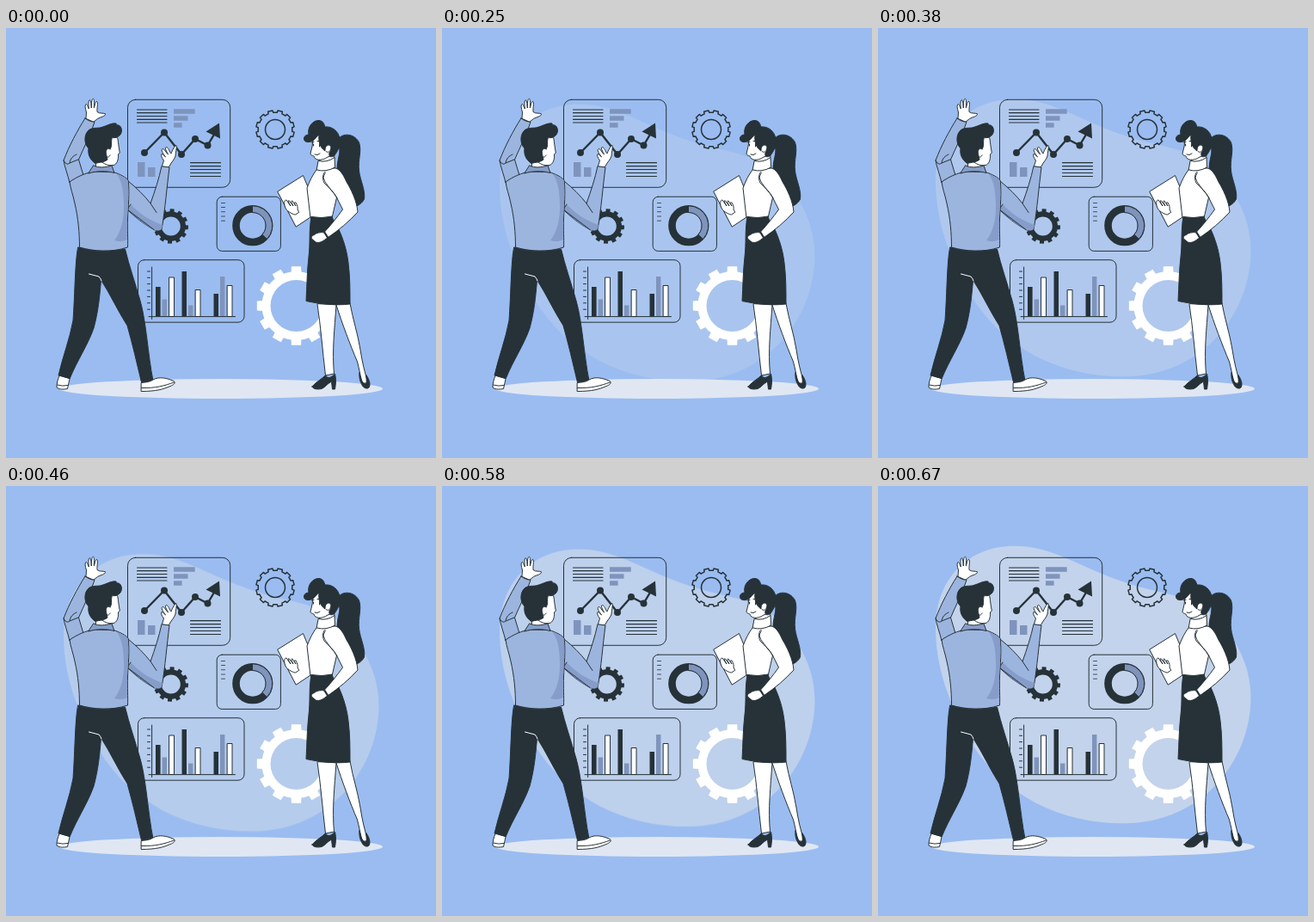
An HTML page that plays this animation: 500x500 px, repeating every 710 ms.

```html
<!DOCTYPE html>
<html lang="en">
<head>
<meta charset="utf-8">
<title>Data presentation</title>
<style>
  html, body { margin: 0; width: 100%; height: 100%; overflow: hidden; background: #9abcf1; }
  svg { display: block; width: 100vw; height: 100vh; }
  .k { fill: #263238; }
  .g { fill: #7f94bd; }
  .w { fill: #fff; }
  .shirt { fill: #9cb5df; }
  .shade { fill: #869dca; }
  .l { fill: none; }
  .o { stroke: #263238; stroke-width: 1; stroke-linejoin: round; stroke-linecap: round; }
  #blob { animation: rise 710ms -5ms infinite; }
  /* 17 poses per loop; the first two are alike */
  @keyframes rise {
    0% { opacity: .03; transform: translateY(29px); animation-timing-function: steps(1, end); }
    11.765% { opacity: .125; transform: translateY(26.25px); animation-timing-function: steps(15, end); }
    100% { opacity: 1.0625; transform: translateY(-1.875px); }
  }
</style>
</head>
<body>
<svg viewBox="0 0 500 500">
  <path id="blob" fill="#c3d3eb" d="M67 165C67 110 103 69.7 159 69.7C205 69.7 234 95 290 113C332 127 374 126 403 164C424 191 433.5 218 433.5 246C433.5 316 380 392.3 285 392.3C212 392.3 146 360 108 298C82 252 67 210 67 165Z"/>
  <ellipse cx="250" cy="419.5" rx="188" ry="11.5" fill="#e0e7f3"/>

  <!-- gears: centre, outer, root and hub radius, turn -->
  <path class="w" fill-rule="evenodd" data-gear="337.5 323 46 40 30 0"/>
  <path class="k" fill-rule="evenodd" data-gear="191.8 230.5 20.3 17.2 11 4"/>
  <path class="l o" style="stroke-width:1.5" data-gear="313 118 22.3 19.8 11.5 15"/>

  <!-- line chart panel -->
  <rect class="l o" x="141.500" y="83.300" width="119.200" height="102" rx="9"/>
  <path class="l o" style="stroke-width:1.2" d="M152.500 95H187M152.500 98.700H187M152.500 102.500H187M152.500 106.300H187M152.500 110H187M214.500 156.700H249.500M214.500 160.600H249.500M214.500 164.500H249.500M214.500 168.500H249.500M214.500 172.500H249.500"/>
  <path class="g" d="M195 94.300H219.700V99.800H195ZM195 102.300H211.500V107.800H195ZM195 110.300H204.600V115.800H195ZM153 156H161.500V173H153ZM165 162H173.500V173H165Z"/>
  <path class="l o" style="stroke-width:2.4" d="M161 145L184 121.500L204 147L220 129L234.500 136.500L243 122"/>
  <g class="k">
    <circle cx="161" cy="145" r="4"/><circle cx="184" cy="121.500" r="4"/><circle cx="204" cy="147" r="4"/><circle cx="220" cy="129" r="4"/><circle cx="234.500" cy="136.500" r="4"/>
    <path d="M248 110.500L249 128.500L232.500 120.500Z"/>
  </g>

  <!-- donut panel -->
  <rect class="l o" x="245.200" y="196.200" width="74.200" height="63.200" rx="6"/>
  <path class="l o" style="stroke-width:.8" d="M250.500 203.500H254.500M250.500 208.500H254.500M250.500 213.700H254.500M250.500 219H254.500M250.500 224.200H254.500"/>
  <circle class="l" cx="286.800" cy="229.700" r="19.300" stroke="#263238" stroke-width="8.600"/>
  <path class="g o" d="M286.800 206.800A22.900 22.900 0 0 1 303.500 245.400L297.900 240.200A15.200 15.200 0 0 0 286.800 214.500Z"/>

  <!-- bar chart panel -->
  <rect class="l o" x="153.500" y="269.700" width="123.500" height="72.500" rx="7"/>
  <path class="k" d="M174 301H179.600V335.500H174ZM204.500 283H210V335.500H204.500ZM241.500 309H247V335.500H241.500Z"/>
  <path class="g" d="M181.600 315.500H187V335.500H181.600ZM212 322.500H217.400V335.500H212ZM249 289H254.400V335.500H249Z"/>
  <path class="w o" d="M190 290H195.500V335.500H190ZM220.500 304.500H226V335.500H220.500ZM257.500 299.500H263V335.500H257.500Z"/>
  <path class="l o" d="M169.600 278V338.500M166 335.600H266.500M164.500 283H167.500M164.500 290.300H167.500M164.500 297.600H167.500M164.500 305H167.500M164.500 312.400H167.500M164.500 319.800H167.500M164.500 327.200H167.500"/>

  <!-- man -->
  <g class="o">
    <path class="w" d="M93 105L93.500 98C92 93 91.500 90 93 88.500C94.500 88 95 92 96.300 94C96 89 95.500 84 97.300 83.800C99 84 98.700 90 99.300 93C99.500 88 99.500 82.500 101.300 82.300C103.200 82.500 102.200 89 102.400 93C103.500 89 104 85 105.700 85.500C107.500 86.500 105.600 92 106 97.500C109 100 113 98.500 115.500 99.800C116 102.500 110 103.500 106.500 105.500L102 109Z"/>
    <path class="shirt" d="M92 105C96 108 99 109 103 109.300C98 125 90 140 84.500 153L90.500 173L74 180C72 171 68 161 67 154C73 138 83 119 92 105Z"/>
    <path class="l" d="M67 154C70 160 73 158 74 157L84 153M74 157C75 151 78 149 82 147"/>
    <path class="w" d="M105 155L104 163C110 166 117 166 121.500 165L121 158Z"/>
    <path class="w" d="M121 127C126 124.500 129 125.500 130 129C130.500 133 131 138 132.300 145L130.500 147C131 153 129 158.500 125 159.500C119 160.500 113 158 110 154L113 132Z"/>
    <path class="k" d="M96 119C100 115 107 117 111 115.500C117 114 123 110 128 111C128 113 130 112.500 132 113.500C136 117 135 124 130 126.500C127 128.500 125 127 123 128C122 133 123.500 138 121 141C117 139 115 144 117 149L118 153C114 156.500 108 156 104 157.500C97 153 95 146 96 140C90 134 91 123 96 119Z"/>
    <path class="w" d="M121 141C117 138 115 144 117 148.500C118 151.500 120 150 121 148"/>
    <path class="shirt" d="M142 178C152 186 161 195 168 204C173 190 178 175 181 160.500C184 159.500 187 160 190 162C187 185 185 211 181.500 231.500C181 237 176 236 172 234.500C160 228 150 220 141 211Z"/>
    <path class="shade" stroke="none" d="M145 205C156 217 168 224 181.800 229C181.500 237 176 236 172 234.500C163 230 152 221 142 211Z"/>
    <path class="l" d="M168 204L175 214.500M145 205L141 211L172 234.500"/>
    <path class="w" d="M181.500 160.500L183.500 154C181 151 180 148 181 146.500C182.500 146 184 149 185.500 150C182 145 180 142 182 140.500C184 140 186 145 188.500 147C186 142 184 139 186.500 138.500C189 139 190 144 192 146C193.500 142 196 137 198 136.500C199 139 197 145 197 149C196 153 192 156 189.500 161.500Z"/>
    <path class="shirt" d="M74 179C82 173 94 168 102 167L125 167.500C132 170 139 173 142 177C144 191 142 208 141.500 222C141 234 142 246 141.500 255C123 261 103 260 85.500 255C85.500 239 84 221 80 204C78 194 75 187 74 179Z"/>
    <path class="shade" stroke="none" d="M129 170C135 172 140 174 141.500 177C143.500 191 141.500 208 141 222L140.500 246C136 249 129 248 126 247C134 237 137 222 137 209C137 195 136 180 129 170Z"/>
    <path class="shade" d="M102 160C108 163 115 162 123 160L126 168.500C116 166 106 166 96 169Z"/>
    <path class="k" d="M84 255C102 261 122 260 138.500 257C143 276 150 296 156 317C163 341 165 380 171 410L157.500 412C152 389 147 367 141 346C130 329 121 309 110.500 293C109 312 107 331 102 349C95 369 83 386 74 408L61 404C66 382 74 362 78 340C80 312 80 284 82.500 262Z"/>
    <path class="l" stroke="#fff" d="M96.500 286L108 289Q110 291 111 294"/>
    <path class="w" d="M62 404.500C60 409 59 413 59 418C63 421 68 420 71.500 419.500L74 408Z"/>
    <path class="l" d="M59.500 415Q66 417 72 415.500"/>
    <path class="w" d="M157.500 412.500C161 412 167 412 171 409C178 405 187 407 195 410.500C198 412.500 195 415 191 416.500C183 420 175 422.500 157.500 422.500Z"/>
    <path class="l" d="M157.500 418.500C174 419 184 416 195.500 412"/>
  </g>

  <!-- woman -->
  <g class="o">
    <path class="k" d="M387 128C394 121 406 124 410.500 133C414 143 409 153 410.500 166C412 178 418 188 416.500 199C413 206 405 209 400 208C401 195 386 178 385 163C385 153 390 144 387 138Z"/>
    <path class="w" d="M362 321C366 347 368 375 371.500 404L381.500 402C379 376 382 350 384 322Z"/>
    <path class="w" d="M384 322C391 344 400 368 408.500 388C411 397 412 406 414.500 413L421 413C417 400 414 388 412 374C409 355 403 338 400 320Z"/>
    <path class="k" d="M356 417C361 411 369 407 371.500 403.500C374 409 379 406 382.500 402C384 408 383.500 414 382.500 420H379.500L378.500 411C373 414 371 418 367 419.500C362 420.500 357 420 356 417Z"/>
    <path class="k" d="M411 401C412 408 415 414 418 414C420 413 419 408 418.500 403C422 408 424 413 422.500 417.500C420 421 415 418 414 415C411 410 410.500 405 411 401Z"/>
    <path class="w" d="M316 190L345.500 171.500L363 214L337.500 231Z"/>
    <path class="w" d="M365 147L364.500 157L381.500 156L382 145Z"/>
    <path class="w" d="M361 165C357 170 353 178 350 186L354 221H379L384.500 197L383 163Z"/>
    <path class="k" d="M355 219.500Q367 222 379 219C380 223 382 225 384 228C391 242 396 256 398 273C400 289 400 305 400 321C383 323 366 321 349 317.500C350 300 350 283 352 266C354 250 352 235 355 219.500Z"/>
    <path class="w" d="M384.500 197L391.500 211C385 220 378 229 370.500 237L374.500 243.500C387 235 399 225 409 214C408 201 401 187 396 179C392 170 388 164 383 163C376 163 370 168 369 174C372 183 380 189 384.500 197Z"/>
    <path class="w" stroke="none" d="M372 165L383 163.800L384 190L371 178Z"/>
    <path class="l" d="M384.500 197C381 190 374 185 370 180C367 174 369 169 371 167"/>
    <path class="w" d="M363.500 154.500Q373 157 382 150.500L382.500 162Q372 168 361.500 165Z"/>
    <path class="w" d="M359 123C356 127 357 133 356 138L354 146C355 149 357 148 358 149C359 154 367 155 374 150C380 149 386 142 387 137L382 121Z"/>
    <path class="k" d="M357 131C352 134 346 133 346.500 128C347 125 350 124 352 124C350 115 357 107 364 107.500C369 108 370 112 371 115C379 114 387 120 388 129C389 136 386 144 381 149C377 151 375 149 376 145C379 142 377 136 373 136C372 140 371 142 371 143C365 139 363 132 364 124C361 126 360 129 357 131Z"/>
    <path class="w" d="M372 138C375 134 379 137 377.500 141C376.500 145 373 145 371.500 143"/>
    <path class="l" d="M357.500 135V137M364.500 135V138M359 147Q362 149 365 146M355.500 133L358 132.500M362 131.500L366 132"/>
    <path class="w" d="M336 217C332 216 326 213 324.500 208C323 204 323.500 200 326 200L331 207C329 203 327 201 329 200.500L334 207C332 203 331 201 333 201L337 207C335 204 335 202 337 203C339 206 339.500 209 339 211L340.500 214Z"/>
    <path class="w" d="M371 238C366 237 361 238 358.500 240.500C356 241.500 354.500 243 355.500 245L360 249C365 250.500 369 248 374 243.500Z"/>
    <path class="l" style="stroke-width:1.600" d="M370 237.500L374 244"/>
  </g>
</svg>
<script>
  // Twelve-toothed wheel with a round hub
  function gear(x, y, outer, root, hub, turn) {
    const pt = (r, deg) => {
      const a = (deg + turn) * Math.PI / 180;
      return (x + r * Math.cos(a)).toFixed(2) + ' ' + (y + r * Math.sin(a)).toFixed(2);
    };
    let d = '';
    for (let a = 0; a < 360; a += 30) {
      d += (a ? 'L' : 'M') + pt(root, a - 8.5) + 'L' + pt(outer, a - 7) +
        'L' + pt(outer, a + 7) + 'L' + pt(root, a + 8.5) +
        `A${root} ${root} 0 0 1 ` + pt(root, a + 21.5);
    }
    return d + `ZM${x - hub} ${y}a${hub} ${hub} 0 1 0 ${2 * hub} 0a${hub} ${hub} 0 1 0 ${-2 * hub} 0Z`;
  }
  for (const el of document.querySelectorAll('[data-gear]')) {
    el.setAttribute('d', gear(...el.dataset.gear.split(' ').map(Number)));
  }
</script>
</body>
</html>
```
